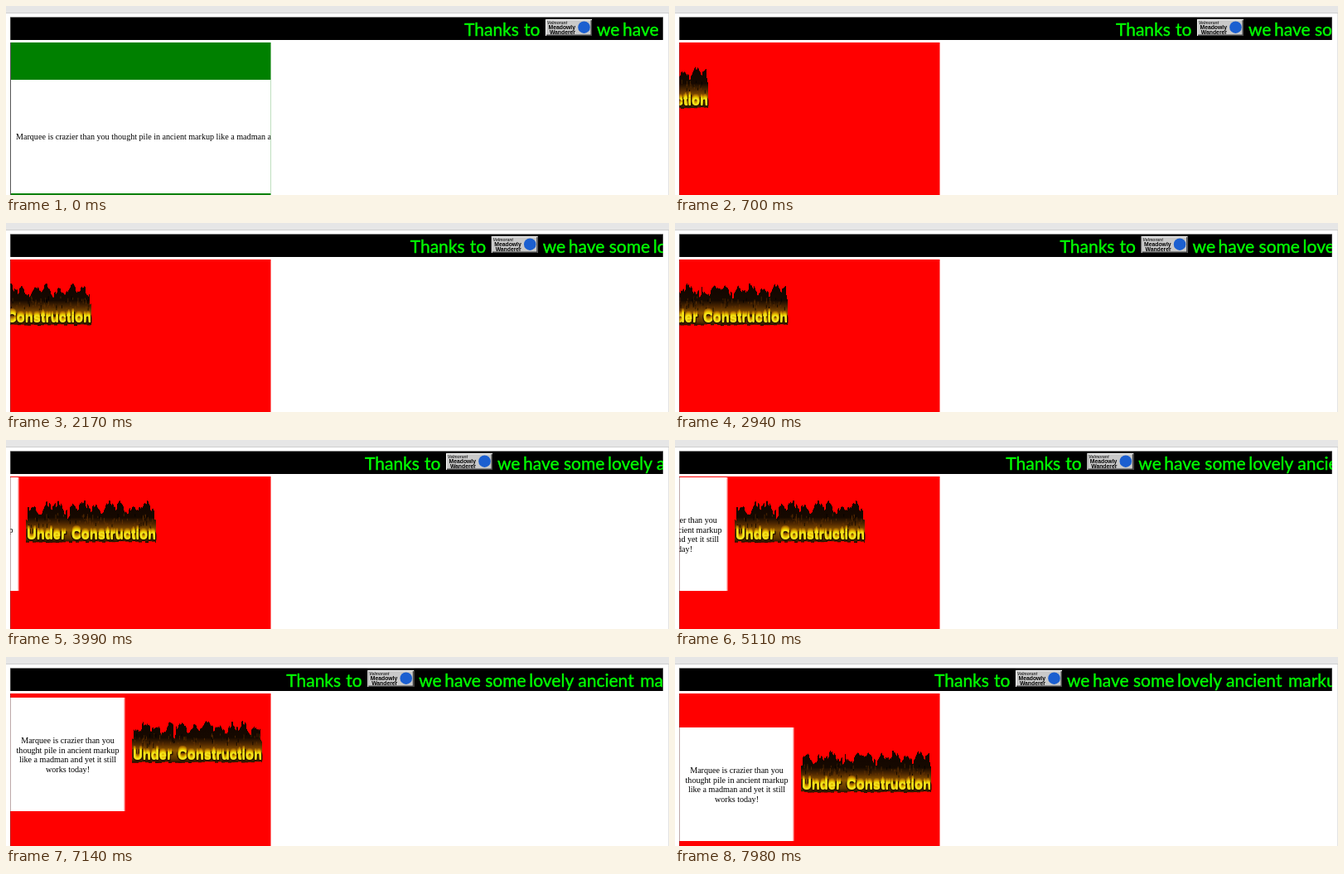
Recreate the animation shown at these times as an HTML page with a canvas. Size 800x228 px, loop 8000 ms.

```html
<!DOCTYPE html>
<html lang="en">
<head>
<meta charset="utf-8">
<title>Marquee</title>
<style>
  html, body { margin: 0; width: 100%; height: 100%; overflow: hidden; background: #fff; }
  canvas { display: block; width: 800px; height: 228px; }
</style>
</head>
<body>
<canvas id="stage" width="800" height="228"></canvas>
<script>
const ctx = document.getElementById('stage').getContext('2d');
const LOOP = 8000, TICK = 70;
const SERIF = '10.1px "Liberation Serif", serif';
const LINES = [
  'Marquee is crazier than you',
  'thought pile in ancient markup',
  'like a madman and yet it still',
  'works today!'
];
const HEADLINE = [
  ['Thanks', 0], ['to', 72], ['we', 160], ['have', 191], ['some', 240],
  ['lovely', 293], ['ancient', 352], ['markup', 427]
];

function rect(color, x, y, w, h) {
  ctx.fillStyle = color;
  ctx.fillRect(x, y, w, h);
}

function text(str, x, y, font, color, align = 'left') {
  ctx.font = font;
  ctx.fillStyle = color;
  ctx.textAlign = align;
  ctx.fillText(str, x, y);
}

function clipped(x, y, w, h, draw) {
  ctx.save();
  ctx.beginPath();
  ctx.rect(x, y, w, h);
  ctx.clip();
  draw();
  ctx.restore();
}

// Repeatable noise in 0..1
function noise(a, b) {
  const v = Math.sin(a * 127.1 + b * 311.7) * 43758.5453;
  return v - Math.floor(v);
}

function drawBadge(x, y) {
  rect('#fff', x, y, 56, 20);
  rect('#444', x + 1, y + 1, 55, 19);
  rect('#c9c9c9', x + 1, y + 1, 53.5, 17.5);
  text('Velmorant', x + 2, y + 6, 'italic bold 5px "Liberation Sans", sans-serif', '#333');
  const bold = 'bold 6.8px "Liberation Sans", sans-serif';
  text('Meadowly', x + 36, y + 12, bold, '#000', 'right');
  text('Wanderer', x + 36, y + 17.5, bold, '#000', 'right');
  ctx.fillStyle = '#1b5fd0';
  ctx.beginPath();
  ctx.arc(x + 46.5, y + 9.7, 7.3, 0, 7);
  ctx.fill();
}

function drawHeadline(tick) {
  const x = 553 - tick * 240 / 114;
  rect('#808080', 5, 13, 788, 28);
  rect('#000', 5.5, 14, 787, 27);
  clipped(5, 13, 788, 28, () => {
    for (const [word, dx] of HEADLINE) {
      const font = '21px Lato, sans-serif';
      text(word, x + dx, 36, font, '#0f0');
      ctx.strokeStyle = '#0f0';
      ctx.lineWidth = 0.4;
      ctx.strokeText(word, x + dx, 36);
    }
    drawBadge(x + 98, 16);
  });
}

function drawFire(x, y, tick) {
  const phase = tick % 8;
  const heat = ctx.createLinearGradient(0, y, 0, y + 51);
  heat.addColorStop(0, '#120500');
  heat.addColorStop(0.4, '#160900');
  heat.addColorStop(0.56, '#532a00');
  heat.addColorStop(0.7, '#8c5600');
  heat.addColorStop(0.9, '#5c3500');
  heat.addColorStop(1, '#1a0900');

  for (let i = 0; i < 157; i++) {
    const edge = i < 2 || i > 154 ? 12 : i > 49 && i < 53 ? 10 : 0;
    const wave = 4 * Math.sin(i * 0.42 + phase * Math.PI / 4) + 3 * Math.sin(i * 0.17 - phase * Math.PI / 4);
    const top = Math.max(0, 8 + wave + 7 * (noise(i >> 1, phase) - 0.5) + edge);
    const bottom = 49 + 2 * noise(i >> 2, phase);
    rect(heat, x + i, y + top, 1, bottom - top);
  }
  for (let i = 0; i < 90; i++) {
    const fx = x + 2 + 152 * noise(i, phase + 20), fy = y + 15 + 15 * noise(i, phase + 40);
    rect(i % 3 ? 'rgba(120,62,0,.5)' : 'rgba(0,0,0,.7)', fx, fy, 1, 2 + 4 * noise(i, 60));
  }

  const font = 'bold 16.4px "Liberation Sans", sans-serif';
  const words = [['Under', 1], ['Construction', 55]];
  const layers = [[-5, '#9a5b00'], [-4, '#b47800'], [-3, '#cc9600'], [-2, '#dfb400'], [-1, '#eed000'], [0, '#f4e31c']];
  ctx.lineJoin = 'round';
  for (const [word, dx] of words) {
    ctx.font = font;
    ctx.textAlign = 'left';
    ctx.strokeStyle = '#2a1400';
    ctx.lineWidth = 3;
    ctx.strokeText(word, x + dx, y + 47);
    for (const [dy, color] of layers) text(word, x + dx, y + 47 + dy, font, color);
  }
}

function drawGreenBox() {
  rect('#008000', 5, 44, 315, 184);
  rect('#fff', 5, 89, 315, 137);
  text(LINES.join(' '), 12, 161, SERIF, '#000');
  rect('#555', 5, 44, 1, 184);
}

function drawRedBox(tick) {
  // Slides in from the left, then drops
  const x = Math.min(152, 3 * tick - 147);
  const drop = Math.max(0, 3 * (tick - 100) - 2);
  const cellRight = x - 9, cellLeft = cellRight - 138, cellTop = 45 + drop;
  rect('#f00', 5, 44, 315, 184);
  rect('#fbb', cellLeft, cellTop, 138.5, 137);
  rect('#fff', cellLeft, cellTop, 137, 137);
  LINES.forEach((line, i) => {
    text(line, cellLeft + 69.5, cellTop + 55 + 11.5 * i, SERIF, '#000', 'center');
  });
  drawFire(x, 73 + drop, tick);
  rect('rgba(90,40,40,.4)', 5, 44, 1, 184);
}

function render(time) {
  const tick = Math.floor((time % LOOP) / TICK);
  rect('#fff', 0, 0, 800, 228);
  rect('#e6e6e6', 0, 0, 800, 8);
  rect('#cfcfcf', 0, 8, 800, 1);
  rect('#e4e4e4', 799, 9, 1, 219);
  drawHeadline(tick);
  clipped(5, 44, 314.5, 184, () => tick < 1 ? drawGreenBox() : drawRedBox(tick));
}

const start = performance.now();
function frame() {
  render(performance.now() - start);
  requestAnimationFrame(frame);
}
frame();
</script>
</body>
</html>
```
